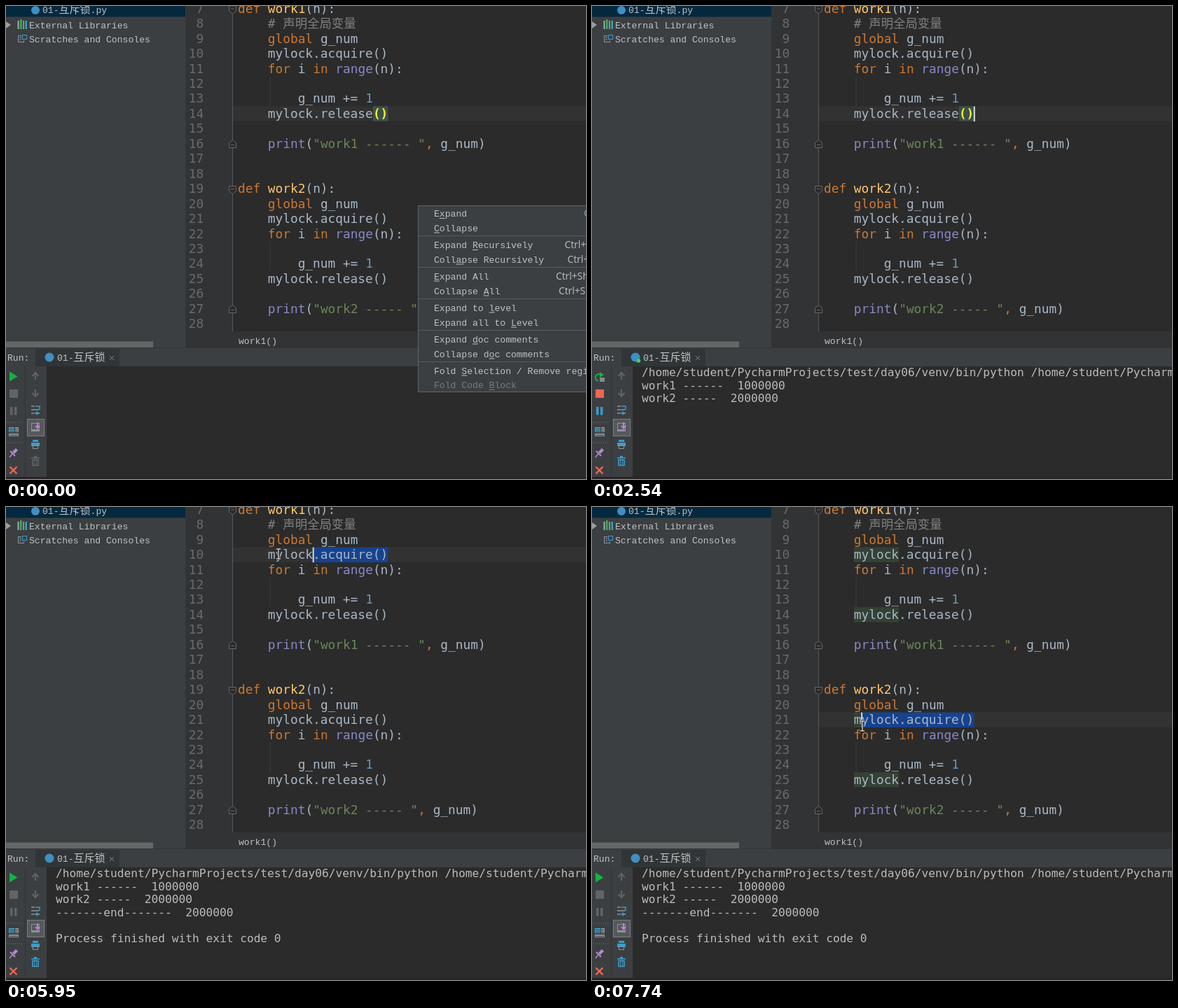
These frames come from a looping animation (828 px wide and 676 px high, 8 s). An HTML page with a canvas:

```html
<!DOCTYPE html>
<html lang="zh">
<head>
<meta charset="utf-8">
<title>Mutex demo</title>
<style>
  html, body { margin: 0; width: 100%; height: 100%; overflow: hidden; background: #2b2b2b; }
  canvas { display: block; }
</style>
</head>
<body>
<canvas id="stage" width="828" height="676"></canvas>
<script>
const ctx = document.getElementById('stage').getContext('2d');
const LOOP = 8000;
const CODE = '17.8px "DejaVu Sans Mono", monospace';
const BOLD = 'bold ' + CODE;
const CONSOLE = '16.21px "DejaVu Sans Mono", monospace';
const UI = '13.1px "Liberation Mono", monospace';
const CJK = '15px "Noto Sans CJK SC", "Noto Sans CJK", sans-serif';
const NOTE = '300 17.4px "Noto Sans CJK SC", "Noto Sans CJK", sans-serif';
const KEYS = '13.8px "Open Sans", "Noto Sans", sans-serif';

const CH = 10.717, LEFT = 331, ROW = 21.45, UI_CH = 7.86;
const C = {
  t: '#a9b7c6', k: '#cc7832', f: '#ffc66d', b: '#8888c6', s: '#6a8759', n: '#6897bb',
  panel: '#3c3f41', edit: '#2b2b2b', gutter: '#313335', ui: '#bfc1c2', note: '#808080',
  grey: '#616466', green: '#12b344', red: '#f26555', blue: '#3a9bcb', steel: '#8b9499'
};

const midY = n => 154 + (n - 14) * ROW;
const colX = c => LEFT + c * CH;

// Tokens: style letter, then text
const body = (name, dashes) => [
  ['kdef ', 'f' + name, 't(n):'],
  ['k    global ', 'tg_num'],
  ['t    mylock.acquire()'],
  ['k    for ', 'ti ', 'kin ', 'brange', 't(n):'],
  [],
  ['t        g_num += ', 'n1'],
  ['t    mylock.release()'],
  [],
  ['b    print', 't(', 's"' + name + ' ' + dashes + ' "', 'k, ', 'tg_num)']
];
const lines = {};
body('work1', '------').forEach((l, i) => lines[i ? i + 8 : 7] = l);
body('work2', '-----').forEach((l, i) => lines[19 + i] = l);

function rect(x, y, w, h, color) {
  ctx.fillStyle = color;
  ctx.fillRect(x, y, w, h);
}
function text(s, x, y, color, font) {
  ctx.font = font;
  ctx.fillStyle = color;
  ctx.fillText(s, x, y);
}
function path(pts, color, { fill = false, close = false, width = 1 } = {}) {
  ctx.beginPath();
  for (let i = 0; i < pts.length; i += 2) ctx.lineTo(pts[i], pts[i + 1]);
  if (close) ctx.closePath();
  ctx.lineWidth = width;
  ctx.strokeStyle = ctx.fillStyle = color;
  fill ? ctx.fill() : ctx.stroke();
}
function box(x, y, w, h, color, width = 1) {
  ctx.lineWidth = width;
  ctx.strokeStyle = color;
  ctx.strokeRect(x, y, w, h);
}
function dot(x, y, r, color) {
  ctx.fillStyle = color;
  ctx.beginPath();
  ctx.arc(x, y, r, 0, 7);
  ctx.fill();
}
const ui = (s, x, mid, color = C.ui) => text(s, x, mid + 4.6, color, UI);
function fileName(x, mid, ext) {
  ui('01-', x, mid);
  text('互斥锁', x + 3 * UI_CH, mid + 5.4, C.ui, CJK);
  if (ext) ui(ext, x + 3 * UI_CH + 45, mid);
}

function drawTree() {
  rect(0, 0, 256, 489, C.panel);
  rect(0, 0, 256, 15.5, '#04293f');
  dot(42, 6, 6, '#3f8fc0');
  fileName(52, 5, '.py');
  path([0, 22, 7, 27, 0, 32], '#9b9ea0', { fill: true });
  ['#9aa4aa', '#49b35c', '#49b35c', '#3fa5d8'].forEach((c, i) =>
    rect(16.5 + i * 3.7, i === 1 ? 19 : 21, 2.2, i === 1 ? 14 : 12, c));
  ui('External Libraries', 33, 27);
  box(17.5, 42.5, 8, 9, C.steel);
  path([19, 45, 24, 45], C.steel);
  path([19, 48, 24, 48], C.steel);
  rect(22, 41, 8, 8, C.panel);
  box(23.5, 41.5, 6, 6, C.blue);
  ui('Scratches and Consoles', 33, 47);
  rect(0, 479.5, 210, 8.5, '#646768');
  rect(256, 0, 1, 489, '#333638');
}

function foldMark(y, up) {
  const d = up ? -1 : 1;
  const p = [318.5, y - 5 * d, 328.5, y - 5 * d, 328.5, y + 2 * d, 323.5, y + 6 * d, 318.5, y + 2 * d];
  path(p, C.edit, { fill: true });
  path(p, '#646769', { close: true });
  path([321, y - d, 326, y - d], '#646769');
}

function drawCode(s) {
  rect(257, 0, 571, 465, C.edit);
  rect(257, 0, 67, 465, C.gutter);
  rect(324, midY(s.line) - 10.8, 504, ROW, '#323232');
  rect(323, 0, 1, 465, '#56595b');
  [12, 23].forEach(n => rect(376.5, midY(n) - 10.5, 1, 2 * ROW, '#3a3c3d'));

  if (s.marks) [10, 14, 21, 25].forEach(n =>
    rect(colX(4), midY(n) - 10.8, 6 * CH, ROW, '#344134'));
  if (s.sel) {
    const x = colX(s.sel[1]);
    rect(x, midY(s.sel[0]) - 10.5, colX(20) - x, ROW, '#17428e');
  }
  if (s.brace) rect(colX(18), midY(s.brace) - 10.8, 2 * CH, ROW, '#3b514d');

  for (let n = 7; n <= 28; n++) {
    const y = midY(n) + 5.9;
    text(n, 282.3 - String(n).length * CH, y, '#686b6e', CODE);
    let x = LEFT;
    for (const tok of lines[n] || []) {
      const str = tok.slice(1), open = s.brace === n;
      text(open ? str.slice(0, -2) : str, x, y, C[tok[0]], CODE);
      if (open) text('()', colX(18), y, '#ffef28', BOLD);
      x += str.length * CH;
    }
  }
  text('#', colX(4), midY(8) + 5.9, C.note, CODE);
  text('声明全局变量', colX(6), midY(8) + 5.9, C.note, NOTE);

  [[5, 0], [262.5, 0], [197.5, 1], [433.5, 1]].forEach(([y, up]) => foldMark(y, up));
  if (s.caret) rect(colX(s.caret[1]) - 0.5, midY(s.caret[0]) - 10.5, 2, 21.5, '#d8d8d8');

  rect(257, 465, 571, 24, C.gutter);
  ui('work1()', 332, 478);
}

function drawRun(s) {
  rect(0, 489, 828, 187, C.panel);
  rect(0, 488, 828, 1, '#323435');
  ui('Run:', 2, 502);
  rect(42, 490, 120, 25, '#303537');
  dot(62, 502, 6.5, '#3f8fc0');
  if (s.running) dot(66.5, 507, 2.8, '#3fd34b');
  fileName(73, 502);
  path([148, 500, 154, 506], '#7d8082');
  path([154, 500, 148, 506], '#7d8082');
  rect(58, 515, 770, 161, C.edit);
  rect(27, 515, 1, 161, '#323536');
  drawTools(s);
  s.out.forEach((l, i) => text(l, 71, 529 + i * 18.55, '#bbbbbb', CONSOLE));
  rect(0, 673, 828, 3, '#2a2427');
}

function drawTools({ running, used }) {
  if (running) {
    ctx.lineWidth = 2;
    ctx.strokeStyle = C.green;
    ctx.beginPath();
    ctx.arc(10, 531, 5, 1.8, 5.4);
    ctx.stroke();
    path([11, 523, 17, 527, 11, 531], C.green, { fill: true });
    rect(11, 531, 7, 6, '#858a8c');
  } else path([5, 522.5, 16.5, 529.5, 5, 536.5], C.green, { fill: true });

  rect(5, 548, 12, 12, running ? C.red : C.grey);
  [6, 12].forEach(x => rect(x, 573, 3.5, 11.5, running ? C.blue : C.grey));

  [594.5, 623.5].forEach(y => {
    for (let x = 1; x < 25; x += 3) rect(x, y, 1, 1, '#72777a');
  });
  // Layout
  rect(4, 602, 8, 7, C.blue);
  rect(13, 602, 5, 7, C.steel);
  rect(4, 611, 14, 4, C.steel);
  [604, 607, 613].forEach(y => rect(5, y, 12, 1, C.panel));

  path([5, 645, 9, 640], '#b18acb', { width: 1.5 });
  path([6, 636, 13, 643], '#b18acb', { width: 2 });
  path([9, 637, 14, 632, 17, 635, 12, 640], '#b18acb', { fill: true });
  path([5.5, 658.5, 15.5, 668.5], C.red, { width: 2.4 });
  path([15.5, 658.5, 5.5, 668.5], C.red, { width: 2.4 });

  [[529, -1], [553, 1]].forEach(([y, d]) => {
    path([42, y - 5 * d, 42, y + 4 * d], C.grey, { width: 2 });
    path([37.5, y, 42, y + 5 * d, 46.5, y], C.grey, { width: 2 });
  });

  // Soft wrap
  [572, 577, 582].forEach((y, i) => path([36, y, i === 1 ? 47 : 41, y], C.steel, { width: 1.5 }));
  path([42, 572, 48, 572, 48, 577], C.blue, { width: 1.5 });
  path([48, 582, 43, 582], C.blue, { width: 2 });
  path([45, 579, 41, 582, 45, 585], C.blue, { fill: true });

  rect(30, 590, 25, 25, '#55595c');
  box(30.5, 590.5, 24, 24, '#7b7f81');
  box(36.5, 596.5, 11, 11, C.steel);
  rect(36, 605, 12, 3, C.steel);
  path([45, 595, 45, 602], '#c77be0', { width: 2 });
  path([41, 600, 49, 600, 45, 605], '#c77be0', { fill: true });

  // Printer
  rect(38, 620, 8, 3, C.blue);
  rect(36, 624, 12, 5, C.blue);
  box(38.5, 627.5, 7, 5, C.steel);

  const bin = used ? C.blue : C.grey;
  rect(36, 645, 12, 1.6, bin);
  rect(40, 643, 4, 2, bin);
  box(38, 648.5, 8, 8, bin, 1.6);
  [40.7, 43.3].forEach(x => path([x, 649, x, 656], bin));
}

// Label, row centre, mnemonic index, shortcut, shortcut x
const menu = [
  ['Expand', 296.5, 1, 'C', 825], ['Collapse', 317, 0],
  ['Expand Recursively', 341.5, 7, 'Ctrl+Alt', 797.5], ['Collapse Recursively', 362, 4, 'Ctrl+', 801.5],
  ['Expand All', 386, 0, 'Ctrl+Shift', 785], ['Collapse All', 407, 9, 'Ctrl+Shift', 789],
  ['Expand to level', 431, 10], ['Expand all to Level', 452, 14],
  ['Expand doc comments', 476, 7], ['Collapse doc comments', 497, 10],
  ['Fold Selection / Remove region', 521, 5], ['Fold Code Block', 541.5, 10]
];
function drawMenu() {
  rect(588, 285, 240, 267, C.panel);
  box(588.5, 285.5, 260, 266, '#616466');
  [328, 373, 418, 463, 508].forEach(y => rect(589, y, 239, 1, '#585b5d'));
  menu.forEach(([label, y, key, cut, x], i) => {
    const color = i === 11 ? '#777a7b' : C.ui;
    ui(label, 611, y, color);
    rect(611 + key * UI_CH, y + 6.5, UI_CH, 1, color);
    if (cut) text(cut, x, y + 4.5, i ? C.ui : '#66b5d0', KEYS);
  });
}

// Pointer samples of the screen recording: time, x, y
const pointer = [
  [0], [440, 827, 100], [590], [3590, 804, 189], [3740, 655, 128], [3890, 515, 74],
  [4030, 432, 43], [4180, 413, 38], [4320, 418, 41], [4470, 436, 48], [4620, 465, 56],
  [4770, 500, 63], [4920, 525, 67], [5060, 538, 69], [5210, 543, 69], [5350, 546, 68],
  [5500, 547, 68], [5800, 500, 68], [5950, 389, 67], [6100, 372, 68], [6250, 342, 74],
  [6400, 377, 95], [6550, 325, 103], [6700, 277, 110], [6850, 267, 135], [7000, 420, 220],
  [7150, 664, 296], [7300, 600, 304], [7450, 546, 307], [7600, 445, 309], [7740, 386, 313]
];
// Selection steps: time, row, first column
const drags = [[5800, 10, 16], [5950, 10, 10], [6100, 10, 4], [6250, 10, 1],
  [7450, 21, 20], [7600, 21, 11], [7740, 21, 5]];
const at = (list, t) => list.filter(e => e[0] <= t).pop();

function drawPointer(t) {
  const [, x, y] = at(pointer, t);
  if (x === undefined) return;
  [['#171717', 3], ['#e6e6e6', 1.3]].forEach(([color, width]) => {
    path([x, y - 7, x, y + 7], color, { width });
    [-7, 7].forEach(d => path([x - 3, y + d, x + 3, y + d], color, { width }));
  });
}

const home = '/home/student/PycharmProjects/test/day06/';
const output = [
  [2240, home + 'venv/bin/python ' + home], [2540, 'work1 ------  1000000'],
  [2540, 'work2 -----  2000000'], [5060, '-------end-------  2000000'],
  [5060, ''], [5060, 'Process finished with exit code 0']
];

function stateAt(t) {
  const drag = at(drags, t);
  const blink = t >= 2240 && Math.floor((t - 2240) / 446) % 2 === 0;
  return {
    line: drag ? drag[1] : 14,
    sel: drag && drag[2] < 20 && drag.slice(1),
    caret: drag ? drag.slice(1) : blink && [14, 20],
    brace: !drag ? 14 : drag[2] === 20 ? drag[1] : 0,
    marks: t >= 6100 && t < 6400 || t >= 7740,
    running: t >= 2090 && t < 5060,
    used: t >= 2240,
    out: output.filter(o => o[0] <= t).map(o => o[1])
  };
}

function draw(t) {
  const s = stateAt(t);
  drawTree();
  drawCode(s);
  drawRun(s);
  if (t < 140) drawMenu();
  drawPointer(t);
}

const start = performance.now();
function tick() {
  draw((performance.now() - start) % LOOP);
  requestAnimationFrame(tick);
}
tick();
</script>
</body>
</html>
```
